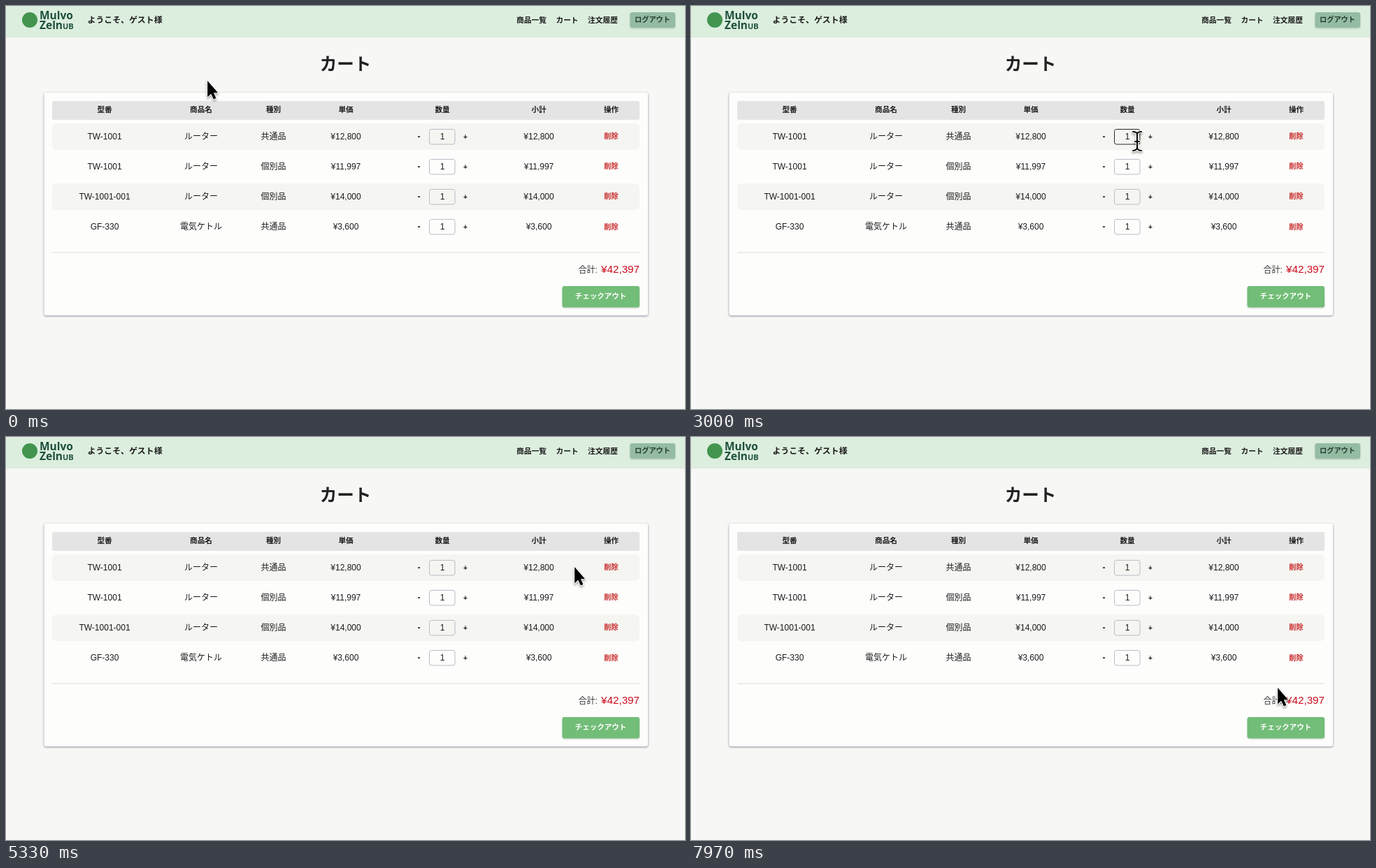
An HTML page that plays this animation: 971 by 577 pixels, repeating every 8000 ms.

```html
<!DOCTYPE html>
<html lang="ja">
<head>
<meta charset="utf-8">
<title>カート</title>
<style>
html, body { margin: 0; width: 100%; height: 100%; overflow: hidden; background: #f7f7f6; }
svg { display: block; width: 971px; height: 577px; }
text { font-family: "Liberation Sans", "Noto Sans CJK JP", "Noto Sans CJK", sans-serif; }
.brand { font-family: "Noto Sans", sans-serif; }
.card { filter: drop-shadow(0 1px 1.5px rgba(50, 50, 75, .55)); }
.btn { filter: drop-shadow(0 1px 1px rgba(0, 0, 0, .2)); }
#cursor { filter: drop-shadow(0 2px 1.5px rgba(0, 0, 0, .35)); }
</style>
</head>
<body>
<svg id="stage" viewBox="0 0 971 577">
  <rect width="971" height="577" fill="#f7f7f6"/>
  <rect width="971" height="44" fill="#dceede"/>
  <rect y="44" width="971" height="1" fill="#dbe4d8"/>
  <g id="page"></g>
  <g id="cursor">
    <path id="arrow" d="M1 2V25.5L6 20.7L9.8 28.6L13.3 27L9.8 19.3H16Z"
      stroke="#fff" stroke-width="2" stroke-linejoin="round" paint-order="stroke"/>
    <g id="beam" fill="none" stroke-linecap="round">
      <path d="M-6-13Q-1-13 0-10Q1-13 6-13M0-10V10M-6 14Q-1 14 0 10Q1 14 6 14M-3 1H3" stroke="#fff" stroke-width="4"/>
      <path d="M-6-13Q-1-13 0-10Q1-13 6-13M0-10V10M-6 14Q-1 14 0 10Q1 14 6 14M-3 1H3" stroke="#000" stroke-width="2"/>
    </g>
  </g>
</svg>
<script>
const $ = id => document.getElementById(id);
const page = $('page');
const LOOP = 8000;

function add(tag, attrs, content) {
  const el = document.createElementNS('http://www.w3.org/2000/svg', tag);
  for (const k in attrs) el.setAttribute(k, attrs[k]);
  if (content) el.textContent = content;
  return page.appendChild(el);
}
const rect = (x, y, width, height, rx, fill, more) =>
  add('rect', { x, y, width, height, rx, fill, ...more });
const text = (str, x, y, size, fill = '#1c1c1c', more) =>
  add('text', { x, y, 'font-size': size, fill, ...more }, str);

const ink = '#1c1c1c';
const mid = { 'text-anchor': 'middle' };
const midBold = { ...mid, 'font-weight': 700 };
const selectable = [];
const cell = (...args) => selectable.push(text(...args));

// Top bar
add('circle', { cx: 34, cy: 20, r: 11, fill: '#43944f' });
const brand = { class: 'brand', 'font-weight': 600 };
text('Mulvo', 48, 19, 15.5, '#1d4f3c', brand);
text('Zeln', 48, 32.5, 15.5, '#1d4f3c', brand);
text('UB', 81, 32.5, 11, '#1d4f3c', brand);
text('ようこそ、ゲスト様', 116.5, 23.5, 11.9, ink, { 'font-weight': 600 });
text('商品一覧', 751.5, 23.5, 10.7, ink, midBold);
text('カート', 802.5, 23.5, 10.7, ink, midBold);
text('注文履歴', 853.5, 23.5, 10.7, ink, midBold);
rect(892.5, 9, 64.5, 22, 3, '#94bca3', { class: 'btn' });
text('ログアウト', 924.5, 23, 10.2, '#243d31', midBold);

// Card
text('カート', 485.5, 91.5, 24.5, '#222', midBold);
rect(54.5, 124, 863.5, 319, 3, '#fdfdfc', { class: 'card' });
rect(66, 136, 840, 27, 3, '#e4e4e4');

const cols = [141, 279, 382.5, 486, 624, 762, 865.5];
['型番', '商品名', '種別', '単価', '数量', '小計', '操作'].forEach((h, i) =>
  cell(h, cols[i], 152.3, 10.6, ink, midBold));

const items = [
  ['TW-1001', 'ルーター', '共通品', '¥12,800'],
  ['TW-1001', 'ルーター', '個別品', '¥11,997'],
  ['TW-1001-001', 'ルーター', '個別品', '¥14,000'],
  ['GF-330', '電気ケトル', '共通品', '¥3,600']
];
const inputs = items.map((item, i) => {
  const y = 187 + i * 43.1;
  if (i % 2 === 0) rect(66, y - 19, 840, 38, 6, '#f5f5f2');
  item.forEach((s, c) => cell(s, cols[c], y + 4.1, 12, ink, mid));
  text('-', 590.5, y + 4, 12, ink, midBold);
  text('+', 657, y + 4, 10, ink, midBold);
  const box = rect(605.5, Math.round(y - 11) + .5, 36.5, 21.5, 3, 'none', { stroke: '#bcbcc6' });
  text('1', 624, y + 4.1, 12, ink, mid);
  cell(item[3], cols[5], y + 4.1, 12, ink, mid);
  text('削除', cols[6], y + 3.2, 10.2, '#c62828', midBold);
  return box;
});

rect(66, 352.5, 840, 1, 0, '#dcdcdc');
text('合計:', 818.5, 382, 12, '#333');
text('¥42,397', 906, 382, 15.2, '#cc0d1c', { 'text-anchor': 'end' });
rect(795.5, 401, 110.5, 30.5, 3, '#72bd77', { class: 'btn' });
text('チェックアウト', 850.5, 419.3, 10.5, '#fff', midBold);

// Pointer
const keys = [
  [0, 287, 105], [1730, 497, 121], [3000, 638, 193], [3900, 642, 211],
  [5330, 812, 184], [6730, 876, 393], [7970, 838, 357]
];
const slope = (i, c) => (keys[i + 1][c] - keys[i][c]) / (keys[i + 1][0] - keys[i][0]);

// Tangents that never overshoot the keys
function tangent(i, c) {
  if (i === 0) return slope(0, c);
  if (i === keys.length - 1) return slope(i - 1, c);
  const a = slope(i - 1, c), b = slope(i, c);
  return a * b > 0 ? 2 * a * b / (a + b) : 0;
}

function pointAt(t) {
  let i = 0;
  while (i < keys.length - 2 && t >= keys[i + 1][0]) i++;
  const span = keys[i + 1][0] - keys[i][0];
  const u = Math.min(1, (t - keys[i][0]) / span), v = 1 - u;
  return [1, 2].map(c =>
    v * v * (1 + 2 * u) * keys[i][c] + u * u * (3 - 2 * u) * keys[i + 1][c] +
    span * u * v * (v * tangent(i, c) - u * tangent(i + 1, c)));
}

const inside = (b, x, y, pad = 0) =>
  x >= b.x - pad && x <= b.x + b.width + pad && y >= b.y - pad && y <= b.y + b.height + pad;
const inputBoxes = inputs.map(el => el.getBBox());
const totalBox = { x: 819, y: 362, width: 88, height: 36 };

function draw(t) {
  const [x, y] = pointAt(t);
  let onText = inside(totalBox, x, y) || selectable.some(el => inside(el.getBBox(), x, y, 1));
  inputs.forEach((el, i) => {
    const hover = inside(inputBoxes[i], x, y);
    el.setAttribute('stroke', hover ? '#2a2a30' : '#bcbcc6');
    onText = onText || hover;
  });
  $('arrow').style.display = onText ? 'none' : '';
  $('beam').style.display = onText ? '' : 'none';
  $('cursor').setAttribute('transform', `translate(${x.toFixed(2)} ${y.toFixed(2)})`);
}

const start = performance.now();
function tick() {
  draw((performance.now() - start) % LOOP);
  requestAnimationFrame(tick);
}
tick();
</script>
</body>
</html>
```
